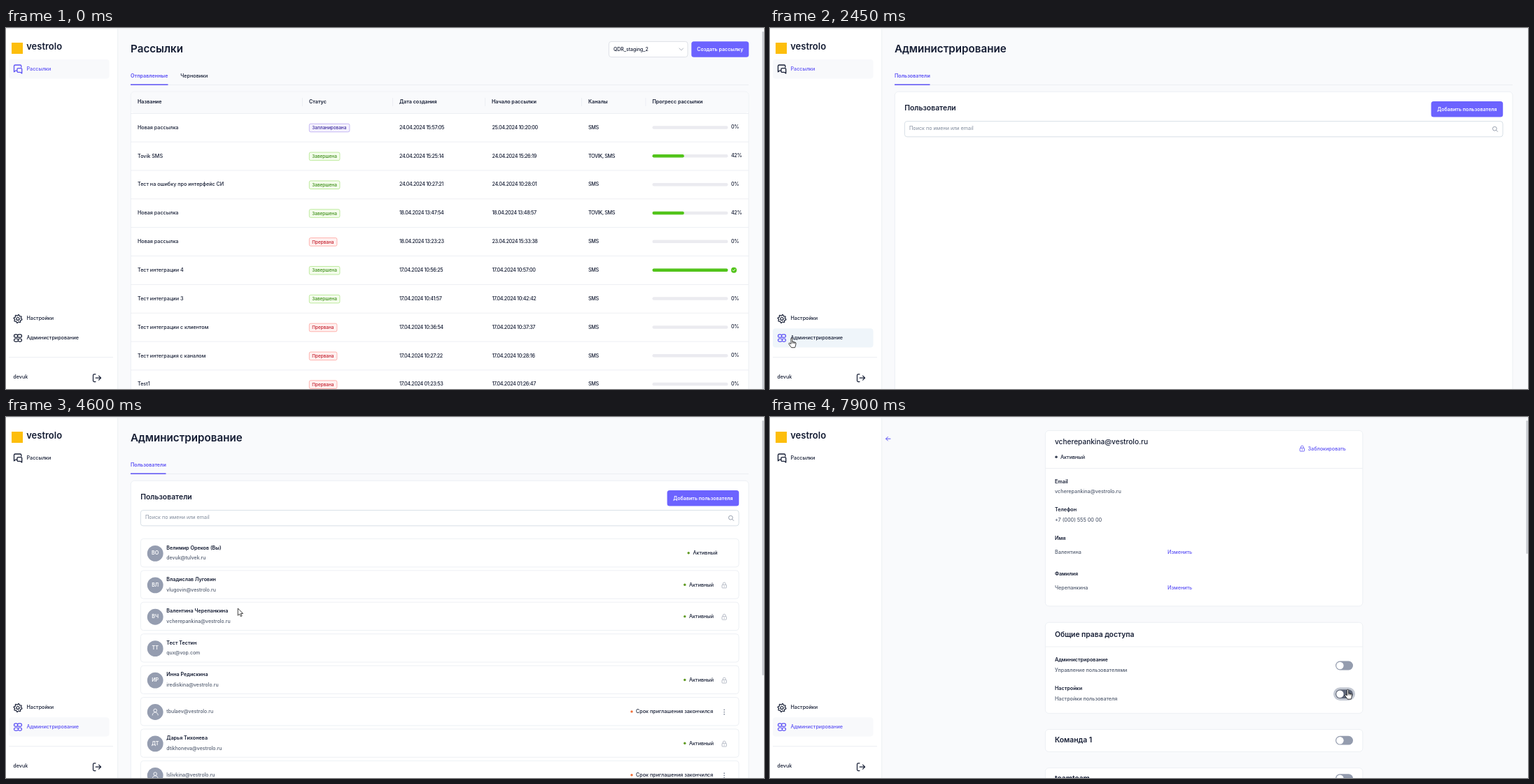
An HTML page that plays this animation: 1083 by 517 pixels, repeating every 8000 ms.

```html
<!DOCTYPE html>
<html lang="ru">
<head>
<meta charset="utf-8">
<title>Рассылки</title>
<style>
  html, body { margin: 0; width: 100%; height: 100%; overflow: hidden; background: #f9fafc; }
  svg { display: block; width: 100%; height: 100%; }
  text { font-family: Inter, "Open Sans", sans-serif; white-space: pre; }
  .num { letter-spacing: -.36px; }
</style>
</head>
<body>
<svg id="stage" viewBox="0 0 1083 517" xmlns="http://www.w3.org/2000/svg"></svg>
<script>
const LOOP = 8000;
const INK = '#141c33', GREY = '#535d70', BLUE = '#5b50f5', FILL = '#6c63ff', LINE = '#e9ecf1';

// Drawing helpers, each returns SVG markup
const text = (x, y, s, o = {}) =>
  `<text x="${x}" y="${y}" font-size="${o.size || 7.2}" font-weight="${o.w || 500}" fill="${o.fill || INK}"` +
  `${o.mid ? ' text-anchor="middle"' : ''}${o.cls ? ` class="${o.cls}"` : ''}>${s}</text>`;
const rect = (x, y, w, h, fill, r = 0, stroke = 'none', extra = '') =>
  `<rect x="${x}" y="${y}" width="${w}" height="${h}" rx="${r}" fill="${fill}" stroke="${stroke}" stroke-width=".8" ${extra}/>`;
const dot = (x, y, r, fill) => `<circle cx="${x}" cy="${y}" r="${r}" fill="${fill}"/>`;
const path = (d, stroke, w = 1, extra = '') =>
  `<path d="${d}" fill="none" stroke="${stroke}" stroke-width="${w}" stroke-linecap="round" stroke-linejoin="round" ${extra}/>`;
const hline = (x1, x2, y) => rect(x1, y - .4, x2 - x1, .8, LINE);
const group = (id, body) => `<g id="${id}">${body}</g>`;
const bold = { w: 600 };

const card = (x, y, w, h) => rect(x, y, w, h, '#fff', 5, LINE);
const scrollbar = h => rect(1080.4, 5, 2.4, h, '#c6c9ce', 1.2);
const button = (x, y, w, s) => rect(x, y, w, 22.6, FILL, 3.5) + text(x + w / 2, y + 13.6, s, { w: 600, fill: '#fff', mid: 1, size: 7.1 });
const heading = s => text(178, 35, s, { w: 600, size: 15.2 });
const tabs = (s, w) => hline(178, 1061, 81.4) + rect(178, 80.4, w, 1.5, BLUE) + text(178, 70.6, s, { w: 600, fill: BLUE });
const lock = (x, y, c) => rect(x - 3.2, y - .8, 6.4, 4.6, 'none', .7, c) +
  path(`M${x - 1.9} ${y - .9}v-1.3a1.9 1.9 0 0 1 3.8 0v1.3M${x} ${y + 1}v1`, c, .8);

function gear(cx, cy) {
  const pts = [];
  for (let i = 0; i < 32; i++) {
    const a = (i + .5) * Math.PI / 16, r = i % 4 < 2 ? 5.9 : 4.5;
    pts.push((cx + r * Math.cos(a)).toFixed(2) + ' ' + (cy + r * Math.sin(a)).toFixed(2));
  }
  return path('M' + pts.join('L') + 'Z', INK, 1.2) + `<circle cx="${cx}" cy="${cy}" r="2" fill="none" stroke="${INK}" stroke-width="1.2"/>`;
}

function sidebar() {
  const pill = (x, y, w) => `M${x + 2} ${y}h${w - 4}a2 2 0 0 1 0 4.2h${4 - w}a2 2 0 0 1 0 -4.2z`;
  return rect(0, 0, 159.5, 517, '#fff') + rect(159.3, 0, .9, 517, '#eaedf1') +
    rect(8, 21, 16, 16, '#fdbe0c') +
    text(29.2, 31.4, 'vestrolo', { w: 600, size: 13 }) +
    rect(4, 45, 143.5, 27.6, '#f8f9fb', 4, 'none', 'id="mailBg"') +
    rect(4, 430.2, 143.5, 27.4, '#eff5fa', 4, 'none', 'id="adminBg"') +
    path('M13 53h7.2a1.6 1.6 0 0 1 1.6 1.6v1.6M14.8 61.2h-1.2l-2.1 1.6v-8.2a1.6 1.6 0 0 1 1.6 -1.6' +
      'M17.4 57.6h3.8a1.5 1.5 0 0 1 1.5 1.5v5.9l-2 -1.6h-3.3a1.5 1.5 0 0 1 -1.5 -1.5v-2.8a1.5 1.5 0 0 1 1.5 -1.5z', INK, 1.3, 'id="mailIcon"') +
    group('mailText', text(29.5, 60.7, 'Рассылки', { fill: 'inherit' })) +
    gear(17, 416.5) + text(29.5, 418.2, 'Настройки') +
    path(pill(11.6, 438.9, 5) + pill(16.6, 438.9, 5.8) + pill(11.6, 445, 5.8) + pill(17.4, 445, 5), INK, 1.2, 'id="adminIcon"') +
    group('adminText', text(29.5, 445.5, 'Администрирование', { fill: 'inherit' })) +
    hline(4, 153, 471.4) + text(10.3, 502.2, 'devuk') +
    path('M128 495.8h-2a1.5 1.5 0 0 0 -1.5 1.5v7.8a1.5 1.5 0 0 0 1.5 1.5h2M128.2 501.2h7.2M132.6 498.2l3 3l-3 3', INK, 1.2);
}

const TAGS = {
  'Запланирована': [58, '#f5f2ff', '#b9a8f0', '#3c2a9c'],
  'Завершена': [44, '#f4fdec', '#b0e68a', '#3a8c14'],
  'Прервана': [40, '#fff1f0', '#ffa39e', '#c41d2b']
};
const [PLAN, DONE, STOP] = Object.keys(TAGS);
// name, status, created, started, channel, progress
const MAILS = [
  ['Новая рассылка', PLAN, '24.04.2024 15:57:05', '25.04.2024 10:20:00', 'SMS', 0],
  ['Tovik SMS', DONE, '24.04.2024 15:25:14', '24.04.2024 15:26:19', 'TOVIK, SMS', 42],
  ['Тест на ошибку про интерфейс СИ', DONE, '24.04.2024 10:27:21', '24.04.2024 10:28:01', 'SMS', 0],
  ['Новая рассылка', DONE, '18.04.2024 13:47:54', '18.04.2024 13:48:57', 'TOVIK, SMS', 42],
  ['Новая рассылка', STOP, '18.04.2024 13:23:23', '23.04.2024 15:33:38', 'SMS', 0],
  ['Тест интеграции 4', DONE, '17.04.2024 10:56:25', '17.04.2024 10:57:00', 'SMS', 100],
  ['Тест интеграции 3', DONE, '17.04.2024 10:41:57', '17.04.2024 10:42:42', 'SMS', 0],
  ['Тест интеграции с клиентом', STOP, '17.04.2024 10:36:54', '17.04.2024 10:37:37', 'SMS', 0],
  ['Тест интеграция с каналом', STOP, '17.04.2024 10:27:22', '17.04.2024 10:28:16', 'SMS', 0],
  ['Test1', STOP, '17.04.2024 01:23:53', '17.04.2024 01:26:47', 'SMS', 0]
];
const COLS = [[188, 'Название'], [433, 'Статус'], [562, 'Дата создания'], [694, 'Начало рассылки'], [832, 'Каналы'], [923.5, 'Прогресс рассылки']];

function mailRow([name, status, made, start, channel, pct], i) {
  const y = 142.2 + 40.85 * i, b = y + 2.5;
  const [w, bg, edge, ink] = TAGS[status];
  return text(188, b, name) +
    rect(433.3, y - 5, w - .4, 11.6, bg, 2, edge) + text(437.3, y + 2.9, status, { size: 6.4, fill: ink }) +
    text(562, b, made, { cls: 'num' }) + text(694.5, b, start, { cls: 'num' }) + text(832, b, channel, { cls: 'num' }) +
    rect(923.5, y - 2, 108, 4.5, '#ebebf0', 2.2) + (pct ? rect(923.5, y - 2, 1.08 * pct, 4.5, '#52c41a', 2.2) : '') +
    (pct === 100
      ? dot(1040, y + .2, 4, '#52c41a') + path(`M1038.3 ${y + .3}l1.2 1.3l2.2 -2.7`, '#fff', .9)
      : text(1036, b - .3, pct + '%', { cls: 'num' })) +
    hline(178, 1061, y + 20.9);
}

function mailPage() {
  return heading('Рассылки') +
    rect(861.4, 19.4, 112.6, 22.2, '#fff', 3.5, '#d6dae1') + text(868, 32.6, 'QDR_staging_2', { size: 6.9 }) +
    path('M962 29l2.8 3l2.8 -3', '#a5abb7', .9) + button(979.3, 19.2, 82, 'Создать рассылку') +
    tabs('Отправленные', 53.5) + text(249.3, 70.6, 'Черновики') +
    card(178.4, 91.2, 882.6, 440) + rect(178.8, 91.6, 881.8, 30.6, '#f9fafc', 5) + hline(178, 1061, 122.4) +
    COLS.map(([x, s], i) => text(x, 108.4, s, bold) + (i ? rect(x - 10, 100, .8, 12, LINE) : '')).join('') +
    MAILS.map(mailRow).join('') + scrollbar(512);
}

// initials, name, mail
const USERS = [
  ['ВО', 'Велимир Ореков (Вы)', 'devuk@tulvek.ru'],
  ['ВЛ', 'Владислав Луговин', 'vlugovin@vestrolo.ru'],
  ['ВЧ', 'Валентина Черепанкина', 'vcherepankina@vestrolo.ru'],
  ['ТТ', 'Тест Тестин', 'qux@vop.com'],
  ['ИР', 'Инна Редискина', 'irediskina@vestrolo.ru'],
  ['', '', 'tbulaev@vestrolo.ru'],
  ['ДТ', 'Дарья Тихонева', 'dtikhoneva@vestrolo.ru'],
  ['', '', 'lslivkina@vestrolo.ru']
];

function userRow([ini, name, mail], i) {
  const y = 174.4 + 45.42 * i, c = y + 20.4, b = c + 2.4;
  const email = { size: 6.95, fill: GREY };
  let s = rect(192.4, y, 854.6, 40.4, '#fff', 4, LINE) + dot(213.2, c + .6, 11.4, '#959db0');
  if (name) {
    s += text(213.2, c + 2.4, ini, { w: 600, fill: '#fff', mid: 1 }) + text(229.3, y + 15.2, name, bold) + text(229.3, y + 29.8, mail, email);
    if (i === 3) return s;
    const x = i ? 976 : 981.4;
    s += dot(x - 6.2, c, 1.7, '#5f9a22') + text(x, b, 'Активный');
    return i ? s + lock(1026.2, c + .8, '#a7aebb') : s;
  }
  s += `<circle cx="213.2" cy="${c - 1.6}" r="2.3" fill="none" stroke="#fff" stroke-width=".9"/>` +
    path(`M209.2 ${c + 5}a4 4 0 0 1 8 0`, '#fff', .9) + text(229.3, b, mail, email) +
    dot(894, c, 1.7, '#f0703a') + text(900, b, 'Срок приглашения закончился');
  for (const d of [-2.6, .6, 3.8]) s += dot(1026.2, c + d, .85, '#7b8496');
  return s;
}

function usersShell() {
  return heading('Администрирование') + tabs('Пользователи', 50.5) + card(178.4, 91.2, 882.6, 440) +
    text(192.3, 118, 'Пользователи', { w: 600, size: 10.4 }) + button(944.6, 105, 102.6, 'Добавить пользователя') +
    rect(192.4, 133.6, 854.6, 22.2, '#fff', 3.5, '#cfd8e0') +
    text(199, 146.4, 'Поиск по имени или email', { fill: '#7f8a9b', w: 400 }) +
    '<circle cx="1035.4" cy="144.2" r="2.9" fill="none" stroke="#8d96a5" stroke-width=".9"/>' + path('M1037.6 146.4l2 2', '#8d96a5', .9);
}

const toggle = (y, id = '') => rect(808, y - 6.4, 25, 12.8, '#949cae', 6.4, 'none', id) + dot(814.4, y, 5.2, '#fff');
const field = (y, dy, label, value, edit) => text(407, y, label, bold) + text(407, y + dy, value, { fill: GREY }) +
  (edit ? text(568, y + dy, 'Изменить', { fill: BLUE }) : '');

function profile() {
  const big = { w: 600, size: 10.3 };
  return card(393.4, 19.4, 453.4, 251.4) + hline(393.4, 846.8, 73.4) +
    text(407, 39.4, 'vcherepankina@vestrolo.ru', { w: 500, size: 10.1 }) + dot(409, 57.3, 1.8, '#3a4356') + text(415, 59.8, 'Активный') +
    lock(760.3, 45.3, BLUE) + text(768.6, 47.9, 'Заблокировать', { fill: BLUE }) +
    field(94.5, 14.6, 'Email', 'vcherepankina@vestrolo.ru') + field(135.4, 14.7, 'Телефон', '+7 (000) 555 00 00') +
    field(176.4, 20, 'Имя', 'Валентина', true) + field(227.4, 20, 'Фамилия', 'Черепанкина', true) +
    card(393.4, 294.2, 453.4, 130.2) + hline(393.4, 846.8, 329) + text(407, 314.5, 'Общие права доступа', big) +
    field(350.2, 14.8, 'Администрирование', 'Управление пользователями') + toggle(356) +
    field(391, 14.8, 'Настройки', 'Настройки пользователя') +
    rect(806.5, 388.8, 28, 15.8, 'none', 7.9, '#c3c8d2', 'id="ring" style="stroke-width:3px"') + toggle(396.7, 'id="pick"') +
    card(393.4, 447.4, 453.4, 32) + text(407, 466, 'Команда 1', big) + toggle(463.2) +
    card(393.4, 502.6, 453.4, 32) + text(407, 521, 'teamteam', big) + toggle(517.6) + scrollbar(191);
}

const stage = document.getElementById('stage');
stage.innerHTML = rect(0, 0, 1083, 517, '#f9fafc') + sidebar() +
  group('mails', mailPage()) +
  group('shell', usersShell()) + group('list', USERS.map(userRow).join('') + scrollbar(365)) +
  group('back', path('M172 31.2h-6.4M168.4 28.4l-2.8 2.8l2.8 2.8', BLUE, 1)) + group('profile', profile()) +
  rect(0, 0, 1083, 1.4, '#eceef1') +
  group('arrow', `<path d="M0 0v10.2l2.4 -2.2l1.7 3.6l1.7 -.8l-1.7 -3.4h3.2z" fill="#fff" stroke="#111" stroke-width=".8" stroke-linejoin="round"/>`) +
  group('hand', `<path d="M-1 .9a1 1 0 0 1 2 0v4.4l4 .9q1.2 .3 1.1 1.6l-.6 3.2l-.9 2.7h-5l-3.6 -5q-.5 -1.3 .7 -1.6l2.3 1.4z" fill="#fff" stroke="#111" stroke-width=".8" stroke-linejoin="round"/>` +
    path('M1 5.3v2.4M2.8 5.8v2M4.4 6.2v1.8', '#111', .6));

const el = {};
stage.querySelectorAll('[id]').forEach(e => el[e.id] = e);

// Pointer track: time, x, y
const TRACK = [
  [410, 1037, 500], [520, 900, 440], [640, 660, 386], [760, 400, 384], [880, 190, 402], [1000, 80, 428], [1100, 40, 441], [1170, 31, 444],
  [2540, 31, 444], [2620, 110, 443], [2720, 300, 436], [2820, 425.4, 426], [2960, 474, 418], [3140, 495, 413], [3330, 500, 411],
  [3370, 499, 409], [3560, 483, 372], [3760, 454, 318], [3900, 440, 296], [4020, 436, 289],
  [4170, 434, 288], [4300, 402, 277], [4450, 358, 271], [4600, 331.4, 274], [4780, 317, 279], [4940, 312.4, 281],
  [5490, 312.4, 281], [5580, 400, 304], [5690, 560, 346], [5790, 660, 370], [5890, 702, 378],
  [6120, 704, 378], [6260, 762, 371], [6420, 838, 360], [6540, 866, 356], [6680, 857, 355.4], [6790, 840, 368], [6900, 824, 380],
  [6950, 823, 382], [7060, 821, 388], [7290, 823, 389], [7440, 823, 388.6], [7580, 825.5, 390.4], [8000, 825.5, 390.4]
];

function pointer(t) {
  const i = TRACK.findIndex(p => p[0] > t);
  if (i < 1) return TRACK[i < 0 ? TRACK.length - 1 : 0].slice(1);
  const [a, b] = [TRACK[i - 1], TRACK[i]], k = (t - a[0]) / (b[0] - a[0]);
  return [a[1] + (b[1] - a[1]) * k, a[2] + (b[2] - a[2]) * k];
}

const show = (id, on) => { el[id].style.display = on ? '' : 'none'; };
const ramp = (t, a, b) => Math.min(1, Math.max(0, (t - a) / (b - a)));

function render(t) {
  show('mails', t < 1710);
  show('shell', t >= 2200 && t < 4980);
  show('list', t >= 2550 && t < 4980);
  show('back', t >= 5030);
  show('profile', t >= 5440);

  const admin = t >= 2550, hover = t >= 1080 && !admin;
  show('mailBg', !admin);
  show('adminBg', hover || admin);
  el.adminBg.style.fill = hover ? '#eff5fa' : '#f8f9fb';
  el.mailIcon.style.stroke = t < 1710 ? BLUE : INK;
  el.adminIcon.style.stroke = t >= 1080 ? BLUE : INK;
  el.mailText.style.fill = admin ? INK : BLUE;
  el.adminText.style.fill = admin ? BLUE : INK;

  const dark = ramp(t, 7020, 7200), mix = (a, b) => Math.round(a + (b - a) * dark);
  el.pick.style.fill = `rgb(${mix(148, 92)},${mix(156, 100)},${mix(174, 118)})`;
  el.ring.style.opacity = ramp(t, 7720, 7880);

  const [x, y] = pointer(t), hand = hover || t >= 7030;
  show('arrow', t >= 410 && !hand);
  show('hand', hand);
  el[hand ? 'hand' : 'arrow'].setAttribute('transform', `translate(${x.toFixed(2)} ${y.toFixed(2)})`);
}

const began = performance.now();
function tick() {
  render((performance.now() - began) % LOOP);
  requestAnimationFrame(tick);
}
tick();
</script>
</body>
</html>
```
